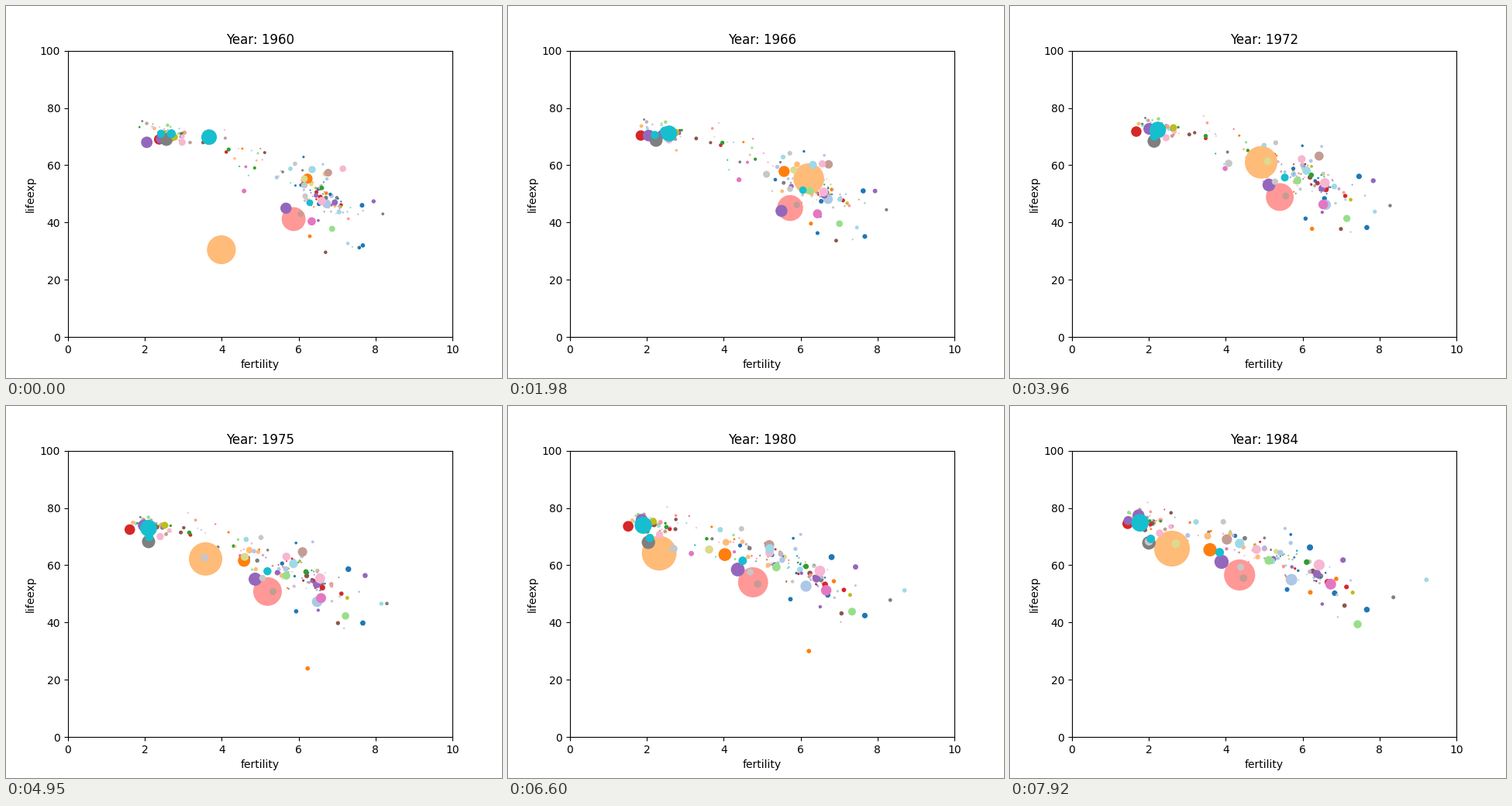
A matplotlib script that plays this animation: 640 by 480 pixels, repeating every 8 s.

```python
import numpy as np
import matplotlib.pyplot as plt
from matplotlib.animation import FuncAnimation

FIRST, COUNT = 1960, 25
STEP, TICK, LOOP = 330, 40, 8000  # ms
YEARS = np.arange(COUNT)
T = YEARS / (COUNT - 1)
TAB = plt.get_cmap("tab20").colors
EARLY, STEADY, LATE, LAST = 0.4, 1, 1.7, 3  # when fertility falls

colors, xs, ys, sizes = [], [], [], []


def dip(year, width, depth):
    return -depth * np.exp(-0.5 * ((YEARS - year) / width) ** 2)


def add(color, pop, start, end, pace=STEADY, shock=0):
    """Bubble going from start to end (fertility, life expectancy)."""
    growth = 0.2 * max(start[0] - 2.2, 0.5)
    colors.append(TAB[color])
    sizes.append(pop * (1 + growth * T))
    xs.append(start[0] + (end[0] - start[0]) * T ** pace)
    ys.append(start[1] + (end[1] - start[1]) * T + shock)


def add_small(rng, count, start, change, spread, biggest):
    """Seeded bubbles that follow the falling trend with some scatter."""
    for _ in range(count):
        f0 = rng.normal(*start)
        f1 = max(f0 - rng.uniform(*change), rng.uniform(1.4, 2.2))
        off = rng.normal(0, spread)
        pop = 0.1 + biggest * rng.random() ** 3
        add(rng.integers(20), pop, (f0, 75.5 - 0.6 * f0 ** 2 + off),
            (f1, 77 - 0.5 * f1 ** 2 + off), rng.choice([EARLY, STEADY, LATE, LAST]))


rng = np.random.default_rng(12)
add_small(rng, 34, (2.6, 0.35), (0.3, 1.2), 1.2, 10)
add_small(rng, 24, (4.8, 0.8), (0.6, 2.8), 2.5, 7)
add_small(rng, 85, (6.6, 0.5), (-0.4, 2.6), 4.2, 12)

# Outliers
add(0, 9, (7.67, 32), (7.67, 44.5))
add(0, 11, (7.65, 46), (6.19, 66.2), LAST)
add(2, 6, (6.29, 35.2), (6.2, 53), shock=dip(17.3, 3, 30))
add(4, 7, (4.18, 65.5), (1.9, 74.9), LATE)
add(8, 8, (7.95, 47.4), (7.05, 61.8), LAST)
add(10, 5, (6.7, 29.6), (7.09, 45.9), EARLY)
add(12, 11, (4.58, 51), (2.64, 66.7), LATE)
add(14, 3, (8.19, 43), (8.36, 48.8))
add(19, 5, (7.28, 32.7), (9.22, 54.9), LATE)

# Large bubbles, back to front
add(1, 50, (6.73, 46.5), (5.71, 55), LAST, dip(13.5, 3.5, 5))
add(2, 72, (6.23, 55.3), (3.59, 65.4))
add(3, 16, (6.7, 57), (3.53, 70.2))
add(3, 667, (5, 30.5), (2.6, 65.8))
# Famine, rebound, then a long fall
xs[-1] = np.interp(YEARS, (0, 1, 3, 6, 9, 12, 15, 18, 20, 24),
                   (3.99, 3.28, 7.4, 6.21, 5.67, 4.92, 3.58, 2.72, 2.32, 2.6))
ys[-1] = np.interp(YEARS, (0, 1, 2, 6, 12, 24), (30.5, 33, 44, 55.3, 61, 65.8))
add(5, 27, (6.61, 47.5), (5.12, 61.7))
add(5, 22, (6.87, 37.8), (7.43, 45), shock=dip(24, 1, 5.6))
add(6, 73, (2.37, 69), (1.45, 74.5), EARLY)
add(7, 450, (5.87, 41.2), (4.36, 56.6), LATE)
add(8, 88, (5.67, 45), (3.89, 61.2), LATE, dip(6, 1.2, 5))
add(8, 22, (6.94, 47), (6.37, 57), EARLY)
add(8, 50, (2.4, 69.1), (1.46, 75.6), LAST)
add(8, 93, (2.05, 68), (1.73, 77.4), LAST)
add(11, 38, (6.77, 57.4), (4.03, 69), LAST)
add(11, 21, (6.05, 43), (4.46, 55.5), LATE)
add(12, 45, (6.34, 40.4), (6.73, 53.4), shock=dip(9, 1.2, 13.7))
add(13, 45, (6.6, 47.5), (6.43, 60.1), LAST)
add(13, 26, (7.15, 58.8), (4.8, 65.5))
add(13, 30, (2.97, 68), (2.28, 71.2), EARLY)
add(14, 120, (2.56, 69), (2, 67.8), EARLY)
add(15, 25, (6.15, 53), (2, 68.3))
add(15, 17, (6.17, 49.2), (4.39, 59.3))
add(16, 30, (2.77, 69.8), (1.72, 76.4), LAST)
add(17, 27, (6.15, 55.3), (2.7, 67.5), LATE)
add(18, 28, (6.29, 46.9), (3.84, 64.5), LATE)
add(18, 43, (2.42, 71), (2.05, 69.2), EARLY)
add(18, 52, (2.69, 71), (1.77, 74.6))
add(18, 181, (3.67, 69.8), (1.77, 74.8), EARLY)
add(19, 33, (6.35, 58.5), (4.36, 67.6), LAST, dip(12.5, 3.2, 5))

xs, ys, sizes = np.array(xs), np.array(ys), np.array(sizes)

fig, ax = plt.subplots(figsize=(6.4, 4.8), dpi=100)
dots = ax.scatter(xs[:, 0], ys[:, 0], s=sizes[:, 0], c=colors)
ax.set(xlim=(0, 10), ylim=(0, 100), xlabel="fertility", ylabel="lifeexp")
title = ax.set_title(f"Year: {FIRST}")


def draw(i):
    n = min((i * TICK + 30) // STEP, COUNT - 1)
    dots.set_offsets(np.column_stack((xs[:, n], ys[:, n])))
    dots.set_sizes(sizes[:, n])
    title.set_text(f"Year: {FIRST + n}")
    return dots, title


anim = FuncAnimation(fig, draw, frames=LOOP // TICK, interval=TICK,
                     repeat=True, repeat_delay=0, blit=False)
plt.show()
```
